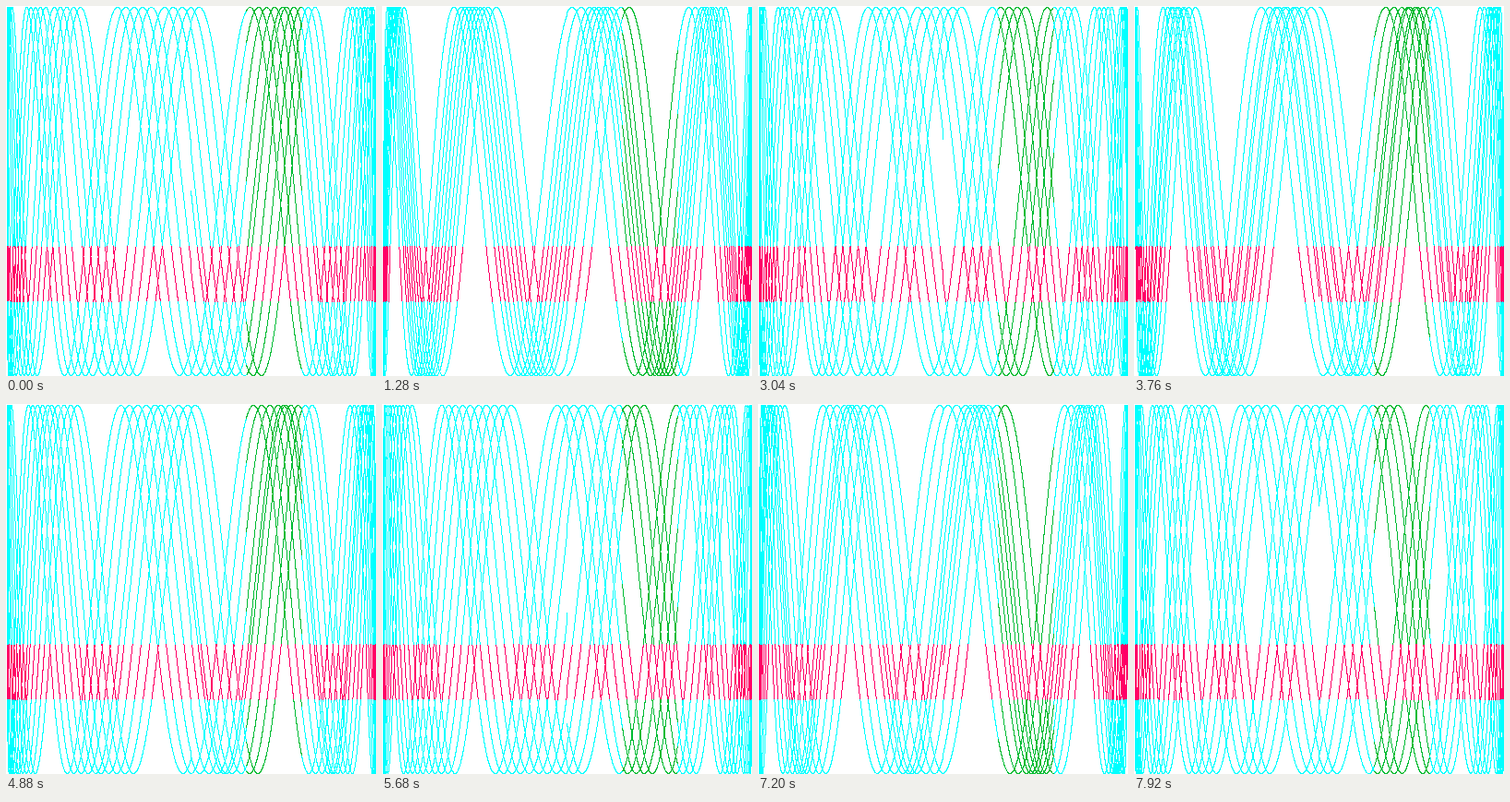
Animation, 401 px wide and 401 px high, one loop 8 s. Source, as an HTML page with a canvas:

```html
<!DOCTYPE html>
<html lang="en">
<head>
<meta charset="utf-8">
<title>Lissajous</title>
<style>
  html, body { margin: 0; width: 100%; height: 100%; overflow: hidden; background: #fff; }
  canvas { display: block; width: 401px; height: 401px; image-rendering: pixelated; }
</style>
</head>
<body>
<canvas id="stage" width="401" height="401"></canvas>
<script>
const RADIUS = 200;
const SIDE = 2 * RADIUS + 1;
const CYCLES = 5;
const FREQ = 15 * 0.6046602879796196;
const T_STEP = 0.0005;
const STEP_MS = 80;
const STEPS = 100;
const PHASE_STEP = 0.1;

const ctx = document.getElementById("stage").getContext("2d");
const image = ctx.createImageData(SIDE, SIDE);
const pixels = new Uint32Array(image.data.buffer);

// Packed as little-endian RGBA.
const rgb = (r, g, b) => (0xff000000 | b << 16 | g << 8 | r) >>> 0;
const WHITE = rgb(255, 255, 255);
const CYAN = rgb(0, 255, 255);
const GREEN = rgb(0, 187, 51);
const PINK = rgb(255, 0, 102);

const inBand = v => v >= 0.3 && v <= 0.6;
// Truncates towards zero, so the figure spans pixels 1 to 400.
const toPixel = v => RADIUS + Math.trunc(v * RADIUS + 0.5);

function draw(phase) {
  pixels.fill(WHITE);
  for (let t = 0; t < CYCLES * 2 * Math.PI; t += T_STEP) {
    const x = Math.sin(t);
    const y = Math.sin(t * FREQ + phase);
    const color = inBand(y) ? PINK : inBand(x) ? GREEN : CYAN;
    pixels[toPixel(y) * SIDE + toPixel(x)] = color;
  }
  ctx.putImageData(image, 0, 0);
}

let shown = 0;
draw(0);

const start = performance.now();
function tick() {
  const elapsed = performance.now() - start;
  const step = Math.floor(elapsed / STEP_MS) % STEPS;
  if (step !== shown) {
    shown = step;
    draw(step * PHASE_STEP);
  }
  requestAnimationFrame(tick);
}
requestAnimationFrame(tick);
</script>
</body>
</html>
```
